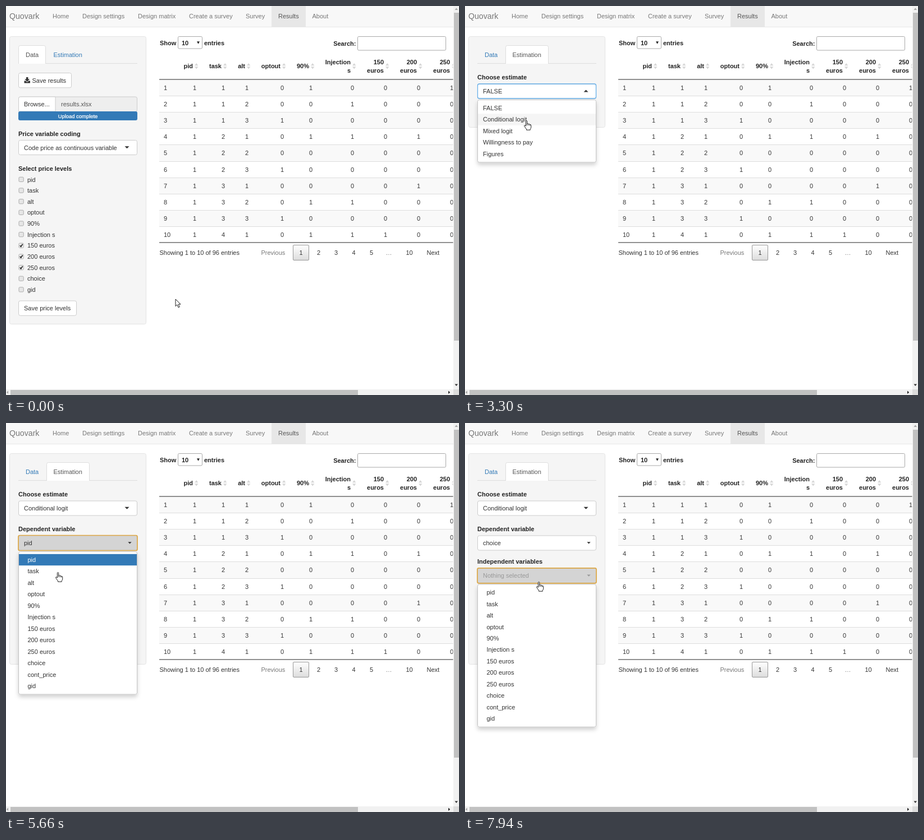
An HTML page that plays this animation: 807 by 694 pixels, repeating every 8 s.

```html
<!DOCTYPE html>
<html lang="en">
<head>
<meta charset="utf-8">
<title>Results panel</title>
<style>
  html, body { margin: 0; width: 100%; height: 100%; overflow: hidden; background: #fff; }
  svg { display: block; font-family: "Liberation Sans", Arial, sans-serif; font-size: 11px; }
  .b { font-weight: bold; }
  .e { text-anchor: end; }
  .m { text-anchor: middle; }
</style>
</head>
<body>
<svg id="stage" width="807" height="694" viewBox="0 0 807 694" xmlns="http://www.w3.org/2000/svg"></svg>
<script>
const LOOP = 8000;

// ---- markup helpers; text is placed by its vertical centre ----
const text = (x, y, s, fill = '#333', cls = '', extra = '') =>
  `<text x="${x}" y="${y + 4}" fill="${fill}" class="${cls}" ${extra}>${s}</text>`;
const bold = (x, y, s, cls = '') => text(x, y, s, '#222', 'b ' + cls);
const rect = (x, y, w, h, fill, stroke = 'none', r = 0, extra = '') =>
  `<rect x="${x}" y="${y}" width="${w}" height="${h}" rx="${r}" fill="${fill}" stroke="${stroke}" ${extra}/>`;
const path = (d, fill, extra = '') => `<path d="${d}" fill="${fill}" ${extra}/>`;
const group = (id, body) => `<g id="${id}">${body}</g>`;
const tri = (x, y, w, h, fill) => path(`M${x - w / 2} ${y - h / 2}h${w}l${-w / 2} ${h}z`, fill);
const button = (y, w, s, id, x = 32) =>
  rect(22.5, y, w, 26.3, '#fff', '#ccc', 3, id ? `id="${id}"` : '') + text(x, y + 13, s);
const select = (y, s, caretX = 215.5, fill = '#333', id = '', caretW = 8) =>
  rect(22.5, y, 211, 26, '#fff', '#ccc', 3, id ? `id="${id}"` : '') +
  text(32, y + 13, s, fill, '', id ? `id="${id}Text"` : '') +
  tri(caretX, y + 12.8, caretW, caretW / 2, fill);
const well = h => rect(6.5, 54.5, 243, h, '#f5f5f5', '#e3e3e3', 3);
const hr = y => rect(22, y, 212, 1, '#eee');

function tabs(first) {
  const [x, w] = first ? [22.5, 48] : [72.5, 76];
  return rect(22, 102, 212, 1, '#ddd') +
    path(`M${x} 103V73.5q0 -3 3 -3h${w - 6}q3 0 3 3V103`, '#fff', 'stroke="#ddd"') +
    text(35, 87, 'Data', first ? '#555' : '#337ab7') +
    text(84.5, 87, 'Estimation', first ? '#337ab7' : '#555', '', first ? 'id="tabLink"' : '');
}

const fields = ['pid', 'task', 'alt', 'optout', '90%', 'Injection s', '150 euros',
  '200 euros', '250 euros', 'choice', 'cont_price', 'gid'];

function menu(y, items, x, mark) {
  const step = 20.45, h = items.length * step + 9;
  return rect(22.5, y, 211, h, '#fff', '#c4c4c4', 3, 'filter="url(#shade)"') + mark +
    items.map((s, i) => text(x, y + 14.4 + i * step, s,
      mark.includes('337ab7') && !i ? '#fff' : '#333')).join('');
}

function navbar() {
  const links = [[83, 'Home'], [136, 'Design settings'], [235, 'Design matrix'],
    [326, 'Create a survey'], [427, 'Survey'], [485, 'Results'], [545.5, 'About']];
  return rect(0, 0, 797, 37.5, '#f8f8f8') + rect(0, 37, 797, 1, '#e7e7e7') +
    rect(473, 0, 61, 38, '#e7e7e7') +
    text(6, 19, 'Quovark', '#777', '', 'font-size="14.15"') +
    links.map(([x, s]) => text(x, 18, s, s === 'Results' ? '#555' : '#777')).join('');
}

// column: right edge of the heading, heading lines, value for row i
const cols = [
  [333, ['pid'], () => 1],
  [384, ['task'], i => 1 + Math.floor(i / 3)],
  [426, ['alt'], i => 1 + i % 3],
  [489, ['optout'], i => +(i % 3 === 2)],
  [540, ['90%'], i => '1001000101'[i]],
  [614, ['Injection', 's'], i => '0101000101'[i]],
  [673, ['150', 'euros'], i => +(i === 9)],
  [732, ['200', 'euros'], i => +(i === 3 || i === 6)],
  [791, ['250', 'euros'], i => +(i === 0)]
];
const ROW = 29.1, TOP = 131.5;

function table() {
  let s = '';
  for (let i = 0; i < 10; i++) {
    const y = TOP + i * ROW;
    s += rect(273, y, 524, ROW, i % 2 ? '#fff' : '#f9f9f9', 'none', 0, `id="row${i}"`);
    if (i) s += rect(273, Math.round(y - .5), 524, 1, '#ddd');
    s += text(281, y + 14.5, i + 1);
    for (const [x, , val] of cols) s += text(x + 6, y + 14.5, val(i), '#333', 'e');
  }
  for (const [x, lines] of cols) {
    lines.forEach((t, k) => s += bold(x, (lines[1] ? 99.5 : 107) + k * 15.7, t, 'e'));
    s += path(`M${x + 3} 106.3h6.4l-3.2 -4.3zM${x + 3} 108.2h6.4l-3.2 4.3z`, '#d6d6d6');
  }
  s += rect(273, 130.5, 524, 1, '#222') + rect(273, 421.5, 524, 1, '#222');
  return `<g clip-path="url(#pane)">${s}</g>`;
}

function tableControls() {
  const pages = [[557, 2], [588, 3], [619.5, 4], [651, 5], [682, '…'], [718.5, 10]];
  return bold(274, 65.5, 'Show') + rect(306.5, 54.5, 43, 21.5, '#fff', '#a9a9a9', 2) +
    bold(313, 65.5, '10') + tri(342.5, 65.5, 5, 4.5, '#222') + bold(353, 65.5, 'entries') +
    bold(623.5, 67, 'Search:', 'e') + rect(626.5, 54.5, 157, 24.5, '#fff', '#a9a9a9', 2) +
    text(273.5, 439.5, 'Showing 1 to 10 of 96 entries') +
    text(454.5, 440, 'Previous', '#777') +
    rect(511.5, 426.5, 28, 27, 'url(#page)', '#979797', 1.5) + text(525.5, 440, 1, '#333', 'm') +
    pages.map(([x, n]) => text(x, 440, n, n === '…' ? '#777' : '#333', 'm')).join('') +
    text(749.5, 440, 'Next');
}

function scrollbars() {
  return rect(797, 0, 10, 684, '#f1f1f1') + rect(798, 12, 9, 585, '#c1c1c1') +
    rect(0, 684, 797, 10, '#f1f1f1') + rect(8, 685, 619, 9, '#c1c1c1') +
    rect(797, 684, 10, 10, '#dcdcdc') +
    path('M799.5 7h5.5l-2.75 -3.5z', '#a3a3a3') + path('M799.5 674.5h5.5l-2.75 3.5z', '#333') +
    path('M4 686.5v5.5l-3 -2.75z', '#a3a3a3') + path('M788 686.5v5.5l3.2 -2.75z', '#222');
}

function dataPanel() {
  const names = fields.filter(f => f !== 'cont_price');
  const boxes = names.map((s, i) => {
    const y = 309.5 + i * 19.65, on = s.endsWith('euros');
    return rect(23, y - 4.2, 8.2, 8.2, on ? '#f4f4f4' : '#e6e6e6', '#ababab', 1.5) +
      (on ? path(`M24.8 ${y - .2}l1.8 2.2l3 -4.6`, 'none', 'stroke="#222" stroke-width="1.7"') : '') +
      text(38, y, s);
  }).join('');
  return well(513) + tabs(true) +
    button(119.5, 94, 'Save results', 'save', 46.5) +
    path('M36 127h3.4v3.6h2.8l-4.5 4.3l-4.5 -4.3h2.8zM32.5 133.5h2.3l2.9 2.6l2.9 -2.6h2.4v4h-10.5z', '#333') +
    rect(22.5, 162, 211, 26.5, '#eee', '#ccc', 3) +
    path('M88 162H25.5q-3 0 -3 3V188H88z', '#fff', 'stroke="#ccc"') +
    text(32, 175, 'Browse...') + text(98, 175, 'results.xlsx', '#555') +
    rect(22, 188, 212, 16, '#337ab7', 'none', 3) +
    text(128, 195.6, 'Upload complete', '#fff', 'm', 'font-size="9.43" stroke="#fff" stroke-width=".25"') +
    bold(22, 227.5, 'Price variable coding') +
    select(239.5, 'Code price as continuous variable') +
    bold(22, 290, 'Select price levels') + boxes +
    button(526, 103, 'Save price levels');
}

function estimatePanel() {
  const ring = (id, y) => rect(22, y, 212, 27, 'none', '#dda744', 2.5, `id="${id}" stroke-width="1.7"`);
  return group('wellShort', well(162) + hr(185)) +
    group('wellLong', well(376) + hr(398) +
      bold(22, 189, 'Dependent variable') + select(201, 'pid', 220.5, '#333', 'dep', 6.4) + ring('depRing', 200.5) +
      bold(22, 247, 'Independent variables') +
      select(259.3, 'Nothing selected', 220.5, '#999', 'ind', 6.4) + ring('indRing', 258.8) +
      bold(22, 305.5, 'Group variable') + select(317.5, 'pid', 220.5, '#333', 'grp', 6.4) +
      button(356, 62, 'Estimate')) +
    tabs(false) + bold(22, 127, 'Choose estimate') +
    select(139, 'FALSE', -20, '#333', 'kind') +
    group('caretDown', tri(215.5, 151.8, 8, 4, '#333')) +
    group('caretUp', path('M211.5 153.6h8l-4 -4z', '#333')) +
    group('kindMenu',
      rect(22.5, 139, 211, 26, 'none', '#66afe9', 3, 'stroke-width="1.3"') +
      menu(167.5, ['FALSE', 'Conditional logit', 'Mixed logit', 'Willingness to pay', 'Figures'], 32,
        rect(23, 192.3, 210, 20.4, '#f5f5f5', 'none', 0, 'id="kindHover"'))) +
    group('depMenu', menu(229.6, fields, 38.5,
      rect(23, 233.8, 210, 20.4, '#337ab7') + rect(23, 418, 210, 20.4, '#f5f5f5', 'none', 0, 'id="depHover"'))) +
    group('indMenu', menu(287.8, fields, 38.5, ''));
}

const arrow = path('M0 0V12.6L2.9 9.9L5 14.8L7.2 13.9L5.1 9.1H9z', '#fff', 'stroke="#111" stroke-width=".95"');
const hand = path('M-1.1 1.2Q0 -.4 1.2 1.2V5.8Q2.9 4.9 3.7 6.6Q5.4 5.9 6.1 7.4Q8.2 7.2 8.2 9.2V12.5' +
  'Q7.9 14.4 6.7 15.6V17.2H0V15.8L-3.7 10.6Q-4.5 8.6 -2.7 8.7L-1.1 10.2z' +
  'M1.2 5.8V9M3.7 6.6V9.2M6.1 7.4V9.5', '#fff', 'stroke="#111" stroke-width=".95" stroke-linejoin="round"');

const stage = document.getElementById('stage');
stage.innerHTML = `<defs>
  <clipPath id="pane"><rect x="273" y="80" width="523.5" height="360"/></clipPath>
  <linearGradient id="page" x2="0" y2="1"><stop stop-color="#fff"/><stop offset="1" stop-color="#dcdcdc"/></linearGradient>
  <filter id="shade" x="-10%" y="-10%" width="120%" height="125%">
    <feDropShadow dx="0" dy="4.5" stdDeviation="3.5" flood-color="#000" flood-opacity=".18"/></filter>
</defs>` + rect(0, 0, 807, 694, '#fff') + navbar() + table() + tableControls() +
  group('dataPanel', dataPanel()) + group('estimatePanel', estimatePanel()) + scrollbars() +
  group('cursor', group('arrow', arrow) + group('hand', hand));

const el = {};
stage.querySelectorAll('[id]').forEach(n => el[n.id] = n);
const show = (id, on) => el[id].setAttribute('display', on ? 'inline' : 'none');
const fill = (id, c) => el[id].setAttribute('fill', c);

// pointer stops: time, x, y
const track = [
  [300, 302, 523], [450, 302, 498], [600, 297, 430], [720, 287, 382], [850, 262, 310],
  [960, 215, 215], [1080, 162, 146], [1250, 126, 134], [1340, 113, 120], [1500, 111, 84],
  [1730, 111, 84], [1900, 111, 87], [2080, 112, 104], [2320, 112, 147], [2920, 112, 147],
  [3100, 111, 180], [3300, 109.5, 204], [4380, 109.5, 204], [4410, 108, 205],
  [4670, 108, 205], [4800, 106.5, 206], [5300, 106.5, 206], [5660, 92.5, 266],
  [6040, 72, 408], [6350, 70, 426], [7060, 70, 426], [7200, 86, 394], [7400, 110, 335],
  [7580, 132, 278], [7860, 132, 278], [7940, 131.5, 283]
];

function pointer(t) {
  const k = track.findIndex(p => p[0] > t);
  if (k === 0) return track[0].slice(1);
  if (k < 0) return track[track.length - 1].slice(1);
  const [t0, x0, y0] = track[k - 1], [t1, x1, y1] = track[k];
  const u = (t - t0) / (t1 - t0);
  return [x0 + (x1 - x0) * u, y0 + (y1 - y0) * u];
}

function draw(t) {
  const [x, y] = pointer(t);
  const within = (a, b) => t >= a && t < b;
  const onData = t < 1730;
  const kindOpen = within(2630, 3610), long = t >= 3700;
  const depOpen = within(5240, 6550), indOpen = t >= 7640;
  const overSave = onData && x < 117 && y > 119 && y < 146;
  const overTab = onData && x < 149 && y < 103;
  const overGrp = t > 7060 && y > 317 && y < 344;
  const overInd = t > 7060 && y < 286;

  show('dataPanel', onData);
  show('estimatePanel', !onData);
  show('wellShort', !long);
  show('wellLong', long);
  show('kindMenu', kindOpen);
  show('caretUp', kindOpen);
  show('caretDown', !kindOpen);
  show('kindHover', y > 192);
  show('depMenu', depOpen);
  show('depHover', y > 412);
  show('indMenu', indOpen);
  show('depRing', within(5240, 7640));
  show('indRing', indOpen);

  fill('save', overSave ? '#e6e6e6' : '#fff');
  fill('tabLink', overTab ? '#23527c' : '#337ab7');
  fill('dep', depOpen ? '#d4d4d4' : within(3900, 7640) ? '#e6e6e6' : '#fff');
  fill('depText', within(3900, 5240) ? '#555' : '#333');
  fill('ind', indOpen ? '#d4d4d4' : overInd ? '#e6e6e6' : '#fff');
  fill('grp', overGrp ? '#e6e6e6' : '#fff');
  el.dep.setAttribute('stroke', within(3900, 5240) ? '#adadad' : '#ccc');
  el.kindText.textContent = t < 3610 ? 'FALSE' : 'Conditional logit';
  el.depText.textContent = t < 6550 ? 'pid' : 'choice';

  const hot = x >= 273 ? Math.floor((y - TOP) / ROW) : -1;
  for (let i = 0; i < 10; i++) fill('row' + i, i === hot ? '#f5f5f5' : i % 2 ? '#fff' : '#f9f9f9');

  const isHand = overSave || overTab || within(2270, 3610) || within(3900, 6550) || overGrp || overInd;
  show('hand', isHand);
  show('arrow', !isHand);
  el.cursor.setAttribute('transform', `translate(${x.toFixed(2)} ${y.toFixed(2)})`);
}

let start;
function tick(now) {
  if (start === undefined) start = now;
  draw((now - start) % LOOP);
  requestAnimationFrame(tick);
}
draw(0);
requestAnimationFrame(tick);
</script>
</body>
</html>
```
